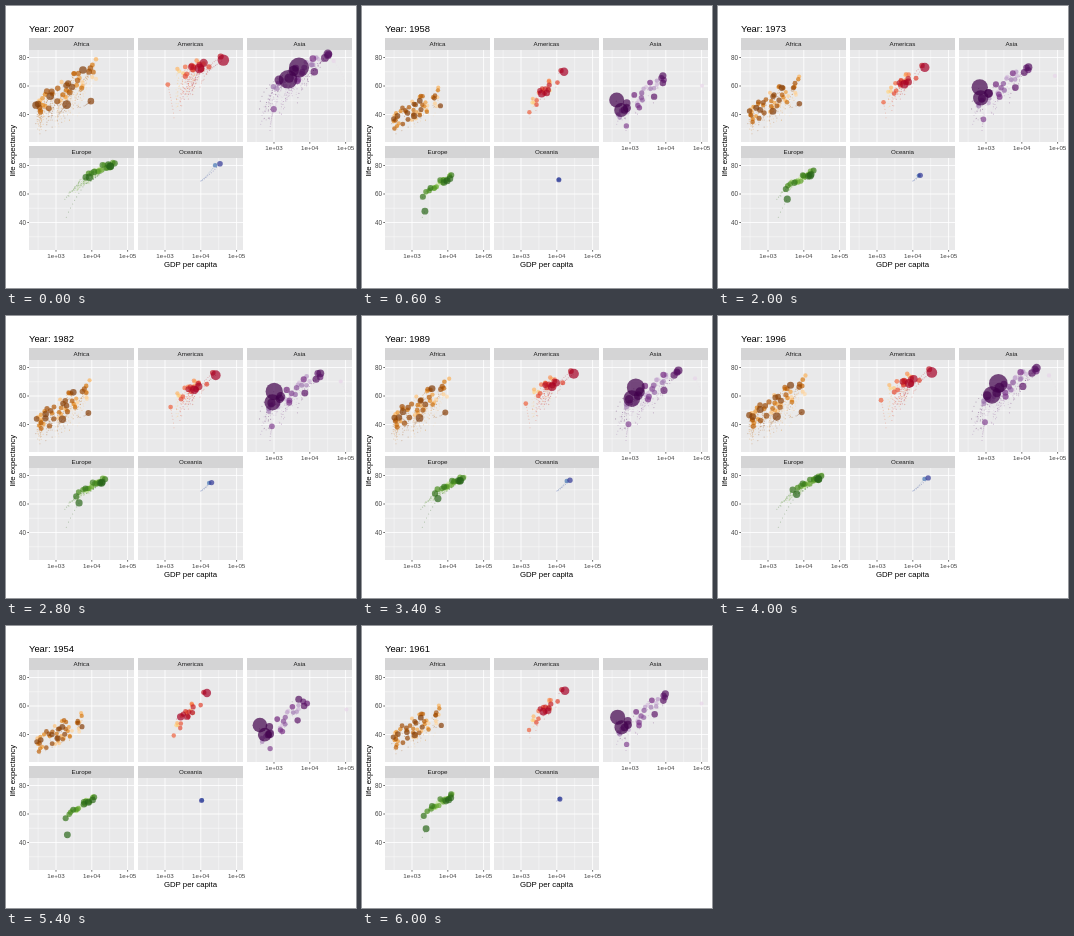
Animation, 350 px wide and 282 px high, one loop 6.2 s. Source, as an HTML page:

```html
<!DOCTYPE html>
<html lang="en">
<head>
<meta charset="utf-8">
<title>Life expectancy and GDP</title>
<style>
  html, body { margin: 0; width: 100%; height: 100%; overflow: hidden; background: #fff; }
  svg { display: block; width: 350px; height: 282px; font-family: "Liberation Sans", Arial, sans-serif; }
</style>
</head>
<body>
<svg id="stage" viewBox="0 0 350 282"></svg>
<script>
const NS = "http://www.w3.org/2000/svg";
const stage = document.getElementById("stage");
const DECADE = 35.8, PER_YEAR = 1.425;
const START = 1952, END = 2007, SURVEYS = 12;

// Points are [log10 income, life span], first in 1952, then in 2007.
// Small countries lie between a poor and a rich corner, both drifting over time.
// "lifePace" and a leader's "pace" are exponents: below 1 gains come early.
const lead = (people, from, to, pace = 1) => ({ people, from, to, pace, rough: 0.1 });

const panels = [
  { name: "Africa", x: 23, y: 44, growth: 0.026, lifePace: 0.6,
    ramp: ["7f3b08", "b35806", "e08214", "fdb863", "fed9a6"],
    small: { n: 46, top: 42, fade: 0.93, skew: 1.4, tall: 7,
      poor: [[2.5, 32], [2.55, 46]], rich: [[3.7, 46], [4.1, 72]] },
    leaders: [
      lead(135, [3.03, 36], [3.3, 46.9]),
      lead(80, [3.15, 42], [3.75, 71.3]),
      lead(76, [2.56, 34], [2.84, 52.9]),
      lead(65, [2.89, 39], [2.44, 46.5], 1.5),
      lead(44, [3.67, 45], [3.97, 49.3], 0.4)
    ] },
  { name: "Americas", x: 132, y: 44, growth: 0.019, lifePace: 0.8,
    ramp: ["a50026", "d73027", "f46d43", "fdae61", "fee090"],
    small: { n: 20, top: 44, fade: 0.83, skew: 1, tall: 4,
      poor: [[3.25, 42], [3.35, 68]], rich: [[4, 64], [4.25, 77]] },
    leaders: [
      lead(301, [4.15, 68.4], [4.63, 78.2]),
      lead(190, [3.32, 50.9], [3.96, 72.4], 0.4),
      lead(109, [3.54, 50.8], [4.08, 76.2], 0.5),
      lead(33, [4.06, 68.8], [4.56, 80.7]),
      lead(8.5, [3.25, 37.6], [3.08, 60.9])
    ] },
  { name: "Asia", x: 241, y: 44, growth: 0.015, lifePace: 0.7,
    ramp: ["40004b", "762a83", "9970ab", "c2a5cf", "e7d4e8"],
    small: { n: 25, top: 90, fade: 0.87, skew: 1.1, tall: 6,
      poor: [[2.6, 37], [2.95, 62]], rich: [[3.9, 58], [4.55, 79]] },
    leaders: [
      lead(1319, [2.6, 44], [3.695, 73], 1.7),
      lead(1110, [2.74, 37.4], [3.39, 64.7], 1.9),
      lead(224, [2.87, 37.5], [3.55, 70.7], 1.3),
      lead(169, [2.84, 43.4], [3.42, 65.5]),
      lead(150, [2.84, 37.5], [3.14, 64.1], 2),
      lead(127, [3.51, 63], [4.5, 82.6], 0.4),
      lead(32, [2.89, 28.8], [2.99, 43.8]),
      lead(2.5, [5.03, 55.6], [4.67, 77.6], 1.3)
    ] },
  { name: "Europe", x: 23, y: 152, growth: 0.006, lifePace: 0.85,
    ramp: ["276419", "4d9221", "7fbc41", "b8e186", "e6f5d0"],
    small: { n: 26, top: 40, fade: 0.9, skew: 0.8, tall: 1.5,
      poor: [[3.15, 56], [3.75, 73]], rich: [[4, 71], [4.6, 81]] },
    leaders: [
      lead(82, [3.85, 67.5], [4.51, 79.4], 0.75),
      lead(71, [3.29, 43.6], [3.93, 71.8]),
      lead(61, [4, 69.2], [4.52, 79.4]),
      lead(58, [3.69, 65.9], [4.46, 80.5], 0.6)
    ] },
  { name: "Oceania", x: 132, y: 152, growth: 0.013, lifePace: 1.2,
    ramp: ["313695", "4575b4"],
    leaders: [
      lead(20, [4, 69.1], [4.54, 81.2]),
      lead(4, [4.02, 69.4], [4.4, 80.2])
    ] }
];

let seed = 20;
function rand() {
  seed = (seed * 16807) % 2147483647;
  return seed / 2147483647;
}
const around = size => size * (2 * rand() - 1);
const mix = (a, b, u) => a + (b - a) * u;

function add(tag, attrs, parent = stage) {
  const el = document.createElementNS(NS, tag);
  for (const key in attrs) el.setAttribute(key, attrs[key]);
  parent.appendChild(el);
  return el;
}

function label(text, x, y, size, fill, anchor = "middle", extra = {}) {
  const el = add("text", { x, y, "font-size": size, fill, "text-anchor": anchor, ...extra });
  el.textContent = text;
  return el;
}

const line = (x1, y1, x2, y2, stroke, width) =>
  add("line", { x1, y1, x2, y2, stroke, "stroke-width": width });

const xOf = (panel, log) => panel.x + 27 + DECADE * (log - 3);
const yOf = (panel, life) => panel.y + 64.5 - PER_YEAR * (life - 40);

function mixRamp(ramp, u) {
  const at = u * (ramp.length - 1);
  const i = Math.min(Math.floor(at), ramp.length - 2);
  const part = (hex, c) => parseInt(hex.slice(c * 2, c * 2 + 2), 16);
  return `rgb(${[0, 1, 2].map(c => Math.round(mix(part(ramp[i], c), part(ramp[i + 1], c), at - i)))})`;
}

function smallCountries({ n, top, fade, skew, tall, poor, rich }) {
  return Array.from({ length: n }, (_, i) => {
    const wealth = rand() ** skew;
    const health = around(tall);
    const [from, to] = [0, 1].map(k => [
      mix(poor[k][0], rich[k][0], wealth) + around(0.06),
      mix(poor[k][1], rich[k][1], wealth) + health
    ]);
    return { people: top * fade ** i, from, to, pace: 1, rough: 1 };
  });
}

// A slightly uneven point every five years.
function surveys({ from, to, pace, rough }, lifePace) {
  return Array.from({ length: SURVEYS }, (_, i) => {
    const u = i / (SURVEYS - 1);
    return [
      mix(from[0], to[0], u ** pace) + around(0.045 * rough),
      mix(from[1], to[1], u ** lifePace) + around(0.8 * rough)
    ];
  });
}

function drawPanel(panel) {
  const { x, y, name } = panel;
  add("rect", { x, y: y - 12, width: 105, height: 12, fill: "#d4d4d5" });
  add("rect", { x, y, width: 105, height: 92, fill: "#e9e9ea" });
  const across = (life, w) => line(x, yOf(panel, life), x + 105, yOf(panel, life), "#fff", w);
  const down = (log, w) => line(xOf(panel, log), y, xOf(panel, log), y + 92, "#fff", w);
  [30, 50, 70].forEach(v => across(v, 0.4));
  [2.5, 3.5, 4.5].forEach(v => down(v, 0.4));
  [40, 60, 80].forEach(v => across(v, 0.85));
  [3, 4, 5].forEach(v => down(v, 0.85));
  label(name, x + 52.5, y - 3.7, 6.2, "#1a1a1a");

  if (x === 23) {
    for (const life of [40, 60, 80]) {
      const ly = yOf(panel, life);
      line(21.3, ly, 23, ly, "#333", 0.7);
      label(life, 20, ly + 2.3, 6.4, "#444", "end");
    }
  }
  if (y > 100 || x > 200) {
    for (const log of [3, 4, 5]) {
      const lx = xOf(panel, log);
      line(lx, y + 92, lx, y + 93.7, "#333", 0.7);
      label(`1e+0${log}`, lx, y + 100.1, 6.2, "#444");
    }
  }
}

panels.forEach(drawPanel);
label("GDP per capita", 184.5, 260.8, 7.8, "#000");
label("life expectancy", 0, 0, 7.8, "#000", "middle", { transform: "translate(8.8 144.7) rotate(-90)" });
const title = label("", 23, 26.4, 9.4, "#000", "start");

const trails = Array.from({ length: SURVEYS }, () => add("g", { "fill-opacity": 0.33 }));
const bubbles = add("g", { "fill-opacity": 0.7 });
const dots = [];

for (const panel of panels) {
  const countries = [...panel.leaders, ...(panel.small ? smallCountries(panel.small) : [])]
    .sort((a, b) => a.people - b.people);
  countries.forEach((country, i) => {
    const rank = 1 - i / (countries.length - 1);
    const fill = mixRamp(panel.ramp, rank ** 1.3);
    const points = surveys(country, panel.lifePace);
    points.forEach(([log, life], k) =>
      add("circle", { cx: xOf(panel, log), cy: yOf(panel, life), r: 0.55, fill }, trails[k]));
    dots.push({ panel, points, people: country.people, el: add("circle", { fill }, bubbles) });
  });
}

// Two runs through the years: the first opens on its last year, the second is cut short.
function yearAt(step) {
  if (step > 25) return START + 0.2 + 2.2 * (step - 26);
  return END - (step ? 25 - step : 0) * 20 / 9;
}

function show(year) {
  title.textContent = `Year: ${Math.round(year - 0.2)}`;
  trails.forEach((g, i) => g.setAttribute("display", START + 5 * i < year ? "inline" : "none"));
  const at = (year - START) / 5;
  const i = Math.min(Math.floor(at), SURVEYS - 2);
  for (const { panel, points, people, el } of dots) {
    const [log, life] = [0, 1].map(k => mix(points[i][k], points[i + 1][k], at - i));
    const now = people * Math.exp(panel.growth * (year - END));
    el.setAttribute("cx", xOf(panel, log));
    el.setAttribute("cy", yOf(panel, life));
    el.setAttribute("r", 1.8 + 8.2 * Math.sqrt(now / 1319));
  }
}

let last = -1;
function tick() {
  const step = Math.floor((performance.now() % 6200) / 200);
  if (step !== last) show(yearAt(last = step));
  requestAnimationFrame(tick);
}
tick();
</script>
</body>
</html>
```
